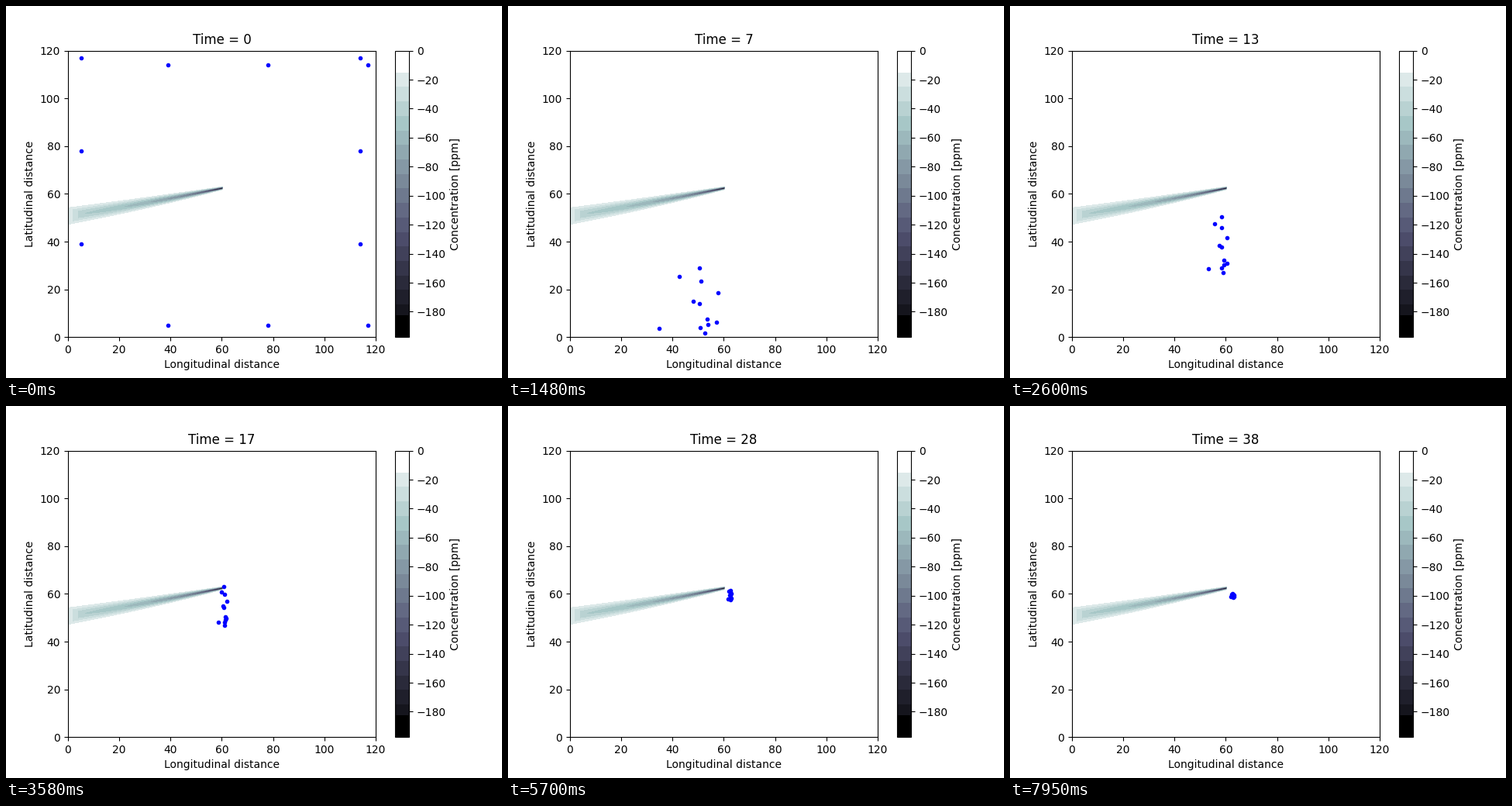
A matplotlib script that plays this animation: 640 by 480 pixels, repeating every 8000 ms.

```python
import numpy as np
import matplotlib.pyplot as plt
from matplotlib.animation import FuncAnimation
from matplotlib.colors import BoundaryNorm, ListedColormap

FRAMES, INTERVAL = 400, 20
DEPTH = 197.5

fig, ax = plt.subplots(figsize=(6.4, 4.8), dpi=100)


def plume(x, y):
    """Concentration of a plume drifting left from its outlet."""
    s = np.maximum(60.3 - x, 0)
    axis = 50.7 + 0.17 * x + 0.0004 * x**2
    width = 0.42 + 0.037 * s
    peak = (DEPTH - 0.5) / (1 + s / 8) ** 0.72
    c = peak * np.exp(-((y - axis) ** 2) / (2 * width**2))
    c *= np.clip(1 + (60.3 - x) / 0.5, 0, 1)
    return -np.minimum(c, 18 + 4.5 * x)


# Concentration bands, every 10 ppm between black and white ends
edges = -np.r_[DEPTH, 182.5, np.arange(175, 10, -10), 0]
mids = (edges[:-1] + edges[1:]) / 2
shades = plt.get_cmap("bone")(1 + mids / DEPTH)
shades[0, :3], shades[-1, :3] = 0, 1

X, Y = np.meshgrid(np.linspace(0, 62, 311), np.linspace(42, 68, 521))
bands = ax.contourf(X, Y, plume(X, Y), levels=edges, cmap=ListedColormap(shades),
                    norm=BoundaryNorm(edges, len(shades)))
ax.set(xlim=(0, 120), ylim=(0, 120),
       xlabel="Longitudinal distance", ylabel="Latitudinal distance")
bar = fig.colorbar(bands, ax=ax, spacing="proportional",
                   ticks=np.arange(-180, 1, 20))
bar.minorticks_off()
bar.set_label("Concentration [ppm]")

# Keep the still parts as one picture, so each frame only draws the swarm
fig.canvas.draw()
backdrop = np.array(fig.canvas.buffer_rgba())
box = ax.get_position()
fig.clear()
fig.figimage(backdrop, zorder=-1)
ax = fig.add_axes(box)
ax.set(xlim=(80, 476.8), ylim=(427.2, 57.6))
ax.axis("off")
title = ax.set_title("", y=1.0)
dots, = ax.plot([], [], "b.")

# Swarm in stage pixels: it starts with three particles on each side,
# gathers, and dives to the bottom
start = np.array([p for k in (39, 78, 117)
                  for p in ((k, 5), (5, k), (k, 114), (114, k))])
start = (80, 427.2) + start * (3.307, -3.08)
gather = np.array([(244, 337), (100, 440), (246, 229), (247, 324),
                   (250, 356), (155, 385), (265, 227), (266, 282),
                   (274, 381), (227, 269), (319, 343), (321, 329)])
dive = np.array([(247, 384), (195, 416), (247, 338), (239, 381),
                 (248, 415), (254, 422), (249, 355), (271, 370),
                 (258, 411), (221, 349), (269, 408), (257, 404)])
T_GATHER, T_DIVE = 39, 74
middle = dive.mean(axis=0)
home = np.array([287.6, 244.8])


def settle(t):
    """After the dive the swarm climbs to its home and shrinks together."""
    t = t - T_DIVE
    pull = np.exp([-t / 56, -(t / 68) ** 1.7])
    spread = 0.05 + 0.95 * np.exp([-t / 45, -(t / 140) ** 2])
    return home + (middle - home) * pull + (dive - middle) * spread


def hermite(a, b, va, vb, h, u):
    return (a + (b - a) * u * u * (3 - 2 * u)
            + h * u * (1 - u) * ((1 - u) * va - u * vb))


v_gather = np.gradient(np.array([start, gather, dive]),
                       [0, T_GATHER, T_DIVE], axis=0)[1]
v_dive = settle(T_DIVE + 1) - dive


def swarm(t):
    if t < T_GATHER:
        return hermite(start, gather, 0, v_gather, T_GATHER, t / T_GATHER)
    if t < T_DIVE:
        h = T_DIVE - T_GATHER
        return hermite(gather, dive, v_gather, v_dive, h, (t - T_GATHER) / h)
    return settle(t)


def draw(n):
    # the clock runs a little slower once the swarm has settled
    step = n if n < 326 else 326 + (n - 326) * 0.86
    dots.set_data(*swarm(step).T)
    title.set_text(f"Time = {int(step / 10)}")
    return dots, title


anim = FuncAnimation(fig, draw, frames=FRAMES, interval=INTERVAL, repeat=True,
                     repeat_delay=0)
plt.show()
```
